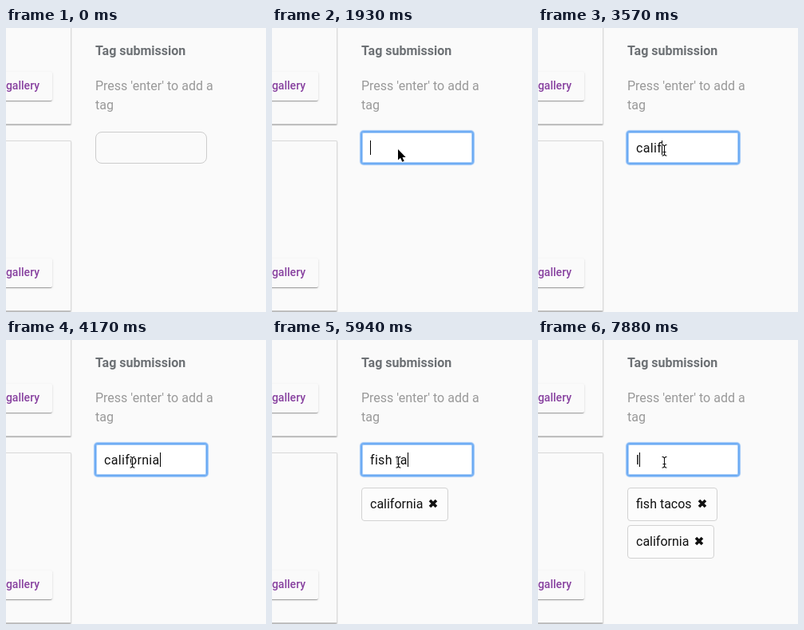
Write an HTML page that moves like this. It is 326 by 356 pixels and loops after 8000 ms.

```html
<!DOCTYPE html>
<html lang="en">
<head>
<meta charset="utf-8">
<title>Tag submission</title>
<style>
  * { box-sizing: border-box; }
  html, body { margin: 0; width: 100%; height: 100%; overflow: hidden; background: #fafafa; }
  body { position: relative; font: 16px/24px Roboto, sans-serif; color: #111; }
  body > *, .card > * { position: absolute; }
  .card {
    left: -120px; width: 202px; height: 214px;
    border: 1px solid #d9d9d9; border-radius: 2px;
    box-shadow: 0 1px 1px rgba(0,0,0,.22), 0 1px 2px rgba(0,0,0,.1);
    border-bottom-color: #c6c6c6;
  }
  .button {
    right: 23px; top: 147px; width: 140px; height: 36px; padding-right: 16px;
    border-radius: 2px; text-align: right; font-weight: 500; font-size: 14px; line-height: 34px;
    color: #8842a0;
    box-shadow: 0 2px 1px -1px rgba(0,0,0,.2), 0 1px 1px rgba(0,0,0,.14), 0 1px 3px rgba(0,0,0,.12);
  }
  h1 { left: 112px; top: 17px; margin: 0; font: inherit; font-weight: 700; color: #6c7074; white-space: nowrap; }
  p { left: 112px; top: 61px; margin: 0; color: #999; white-space: nowrap; }
  #field {
    left: 112px; top: 130px; width: 140px; height: 40px; padding-left: 10px;
    border: 1px solid #ccc; border-radius: 8px; line-height: 40px; white-space: pre;
  }
  #field.focus {
    background: #fff; border-color: #68a8f2; border-radius: 3px;
    box-shadow: 0 0 0 1px #74b0f5, 0 0 1px 2px rgba(120,178,246,.75), inset 0 0 0 1px rgba(120,178,246,.6);
  }
  #typed { letter-spacing: .32px; }
  #caret { top: 141px; width: 1px; height: 18px; background: #000; }
  .tag {
    left: 112px; height: 42px; padding-left: 10px;
    border: 1px solid #d2d2d2; border-radius: 4px; background: #fcfcfc;
    line-height: 40px; white-space: nowrap;
  }
  .tag svg { position: absolute; right: 12px; top: 13px; }
  #pointer { left: 0; top: 0; overflow: visible; }
</style>
</head>
<body>
  <div class="card" style="top:-93px"><div class="button">gallery</div></div>
  <div class="card" style="top:141px"><div class="button">gallery</div></div>
  <h1>Tag submission</h1>
  <p>Press 'enter' to add a<br>tag</p>
  <div id="field"><span id="typed"></span></div>
  <div id="caret"></div>
  <div class="tag" id="tacos" style="top:185px;width:113px">fish tacos</div>
  <div class="tag" id="state" style="width:109px">california</div>
  <svg id="pointer" width="1" height="1">
    <path id="arrow" d="M0 0V13.6L3.1 10.7L5.3 15.8L7.7 14.8L5.5 9.9H9.7Z"
      fill="#000" stroke="#fff" stroke-width="1.4" paint-order="stroke"/>
    <g id="beam" fill="none">
      <path d="M-3-6.5H-1.5L0-5L1.5-6.5H3M0-5V5.5M-3 7H-1.5L0 5.5L1.5 7H3M-2 2.5H2" stroke="#fff" stroke-width="2.4"/>
      <path d="M-3-6.5H-1.5L0-5L1.5-6.5H3M0-5V5.5M-3 7H-1.5L0 5.5L1.5 7H3M-2 2.5H2" stroke="#111" stroke-width="1.1"/>
    </g>
  </svg>
<script>
const LOOP = 8000, FOCUS = 880, TYPING = 2820, FIRST_TAG = 4460, SECOND_TAG = 6840;
const $ = id => document.getElementById(id);

// [time, field text, caret visible]
const typing = [
  [0, '', false], [FOCUS, '', true], [1330, '', false], [1930, '', true], [2380, '', false],
  [TYPING, 'c', true], [2970, 'ca', true], [3120, 'cal', true], [3270, 'cali', true],
  [3570, 'calif', true], [3720, 'califo', true], [3870, 'califor', true],
  [4020, 'californ', true], [4170, 'california', true], [FIRST_TAG, '', true],
  [4910, 'fi', true], [5060, 'fish', true], [5650, 'fish ', true], [5800, 'fish t', true],
  [5940, 'fish ta', true], [6240, 'fish taco', true], [6540, 'fish tacos', true],
  [SECOND_TAG, '', true], [7290, '', false], [7730, '', true], [7880, 'l', true]
];

// [time, x, y]
const pointing = [
  [440, 158, 108.5], [590, 157.5, 136], [730, 157.5, 148], [FOCUS, 158, 152], [TYPING, 158.5, 153]
];

const cross = '<svg width="12" height="12"><path d="M2 2L10 10M10 2L2 10" stroke="#111" stroke-width="3.6"/></svg>';
document.querySelectorAll('.tag').forEach(tag => tag.insertAdjacentHTML('beforeend', cross));

const latest = (steps, t) => steps.filter(step => step[0] <= t).pop();
const show = (id, on) => { $(id).style.display = on ? '' : 'none'; };

function render(t) {
  const [, text, caretOn] = latest(typing, t);
  const spot = latest(pointing, t);

  $('field').classList.toggle('focus', t >= FOCUS);
  $('typed').textContent = text;
  $('caret').style.left = Math.round(123 + $('typed').getBoundingClientRect().width) + 'px';
  show('caret', caretOn);

  show('state', t >= FIRST_TAG);
  show('tacos', t >= SECOND_TAG);
  $('state').style.top = (t >= SECOND_TAG ? 232 : 185) + 'px';

  show('pointer', spot);
  show('arrow', t < TYPING);
  show('beam', t >= TYPING);
  if (spot) $('pointer').style.transform = `translate(${spot[1]}px, ${spot[2]}px)`;
}

const start = performance.now();
function frame() {
  render((performance.now() - start) % LOOP);
  requestAnimationFrame(frame);
}
frame();
</script>
</body>
</html>
```
